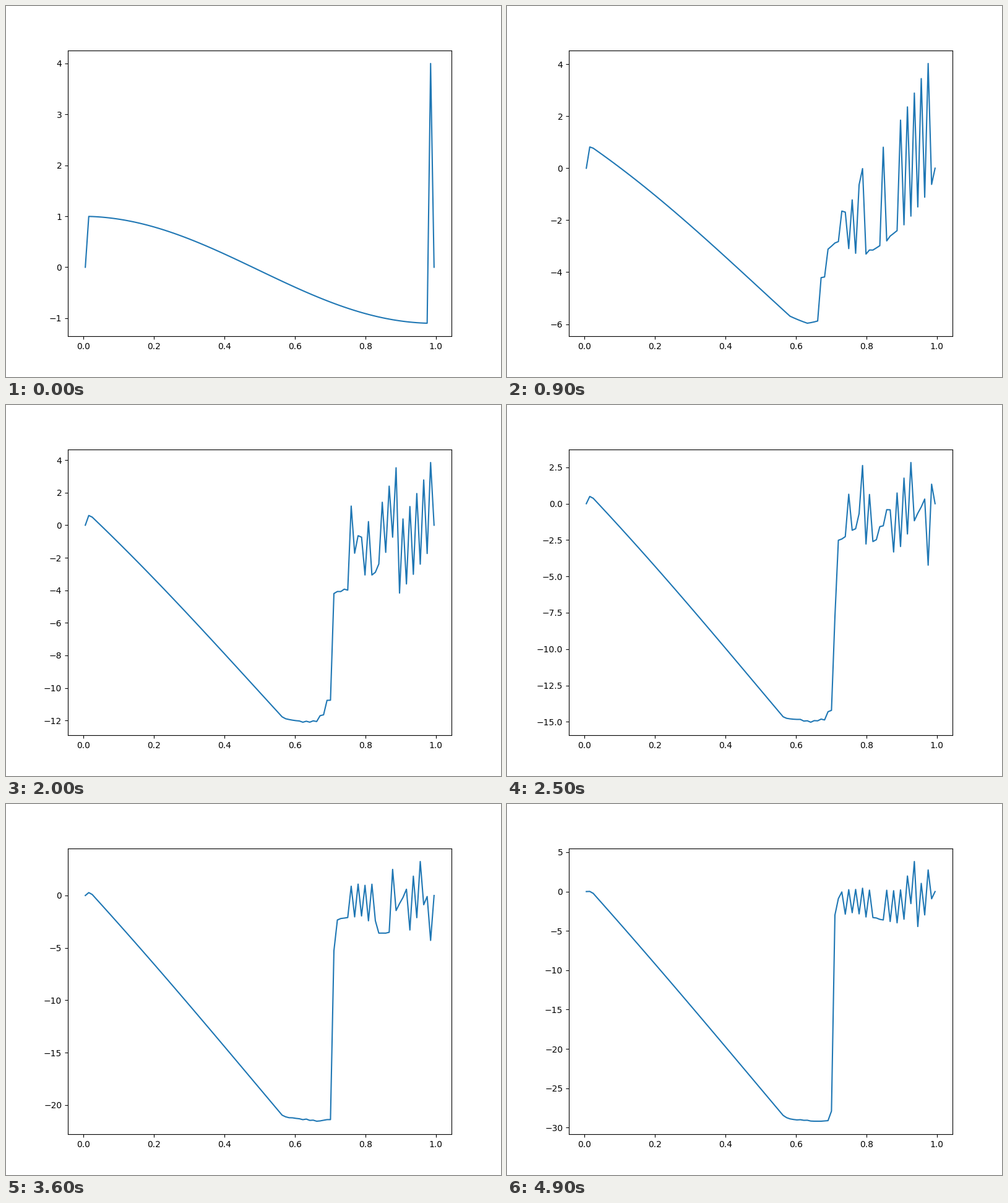
A matplotlib script for the animation above (5000 ms loop, 800 by 600 pixels).

```python
import numpy as np
import matplotlib.pyplot as plt
from matplotlib.animation import FuncAnimation

CELLS = 100
DX = 1 / CELLS
DT = 0.1
FRAMES = 50
STEPS_PER_FRAME = 10

# Interior cells plus one fixed zero cell at each end.
size = CELLS + 2
x_plot = (np.arange(size) + 0.5) / size
grid = np.arange(size) * DX
grid_flux = grid ** 2 / 2


def initial_state():
    u = np.cos(np.pi * grid)
    u[0] = u[-1] = 0
    return u


def godunov_flux(u):
    """Larger flux across shocks, smaller across fans, none at sonic points."""
    left, right = u[:-1], u[1:]
    low, high = grid_flux[:-1], grid_flux[1:]
    sonic = (left <= 0) & (right >= 0)
    return np.where(sonic, 0, np.where(left >= right, high, low))


def advance(u):
    result = u.copy()
    result[1:-1] -= DT / DX * np.diff(godunov_flux(u))
    return result


def simulate():
    states = []
    u = initial_state()
    for step in range((FRAMES - 1) * STEPS_PER_FRAME + 1):
        u = advance(u)
        if step % STEPS_PER_FRAME == 0:
            states.append(u)
    return states


states = simulate()
fig, ax = plt.subplots(figsize=(8, 6), dpi=100)


def draw(frame):
    ax.clear()
    return ax.plot(x_plot, states[frame], color="#1f77b4", linewidth=1.5)


animation = FuncAnimation(fig, draw, frames=FRAMES, interval=100,
                          repeat=True, repeat_delay=0)
plt.show()
```
